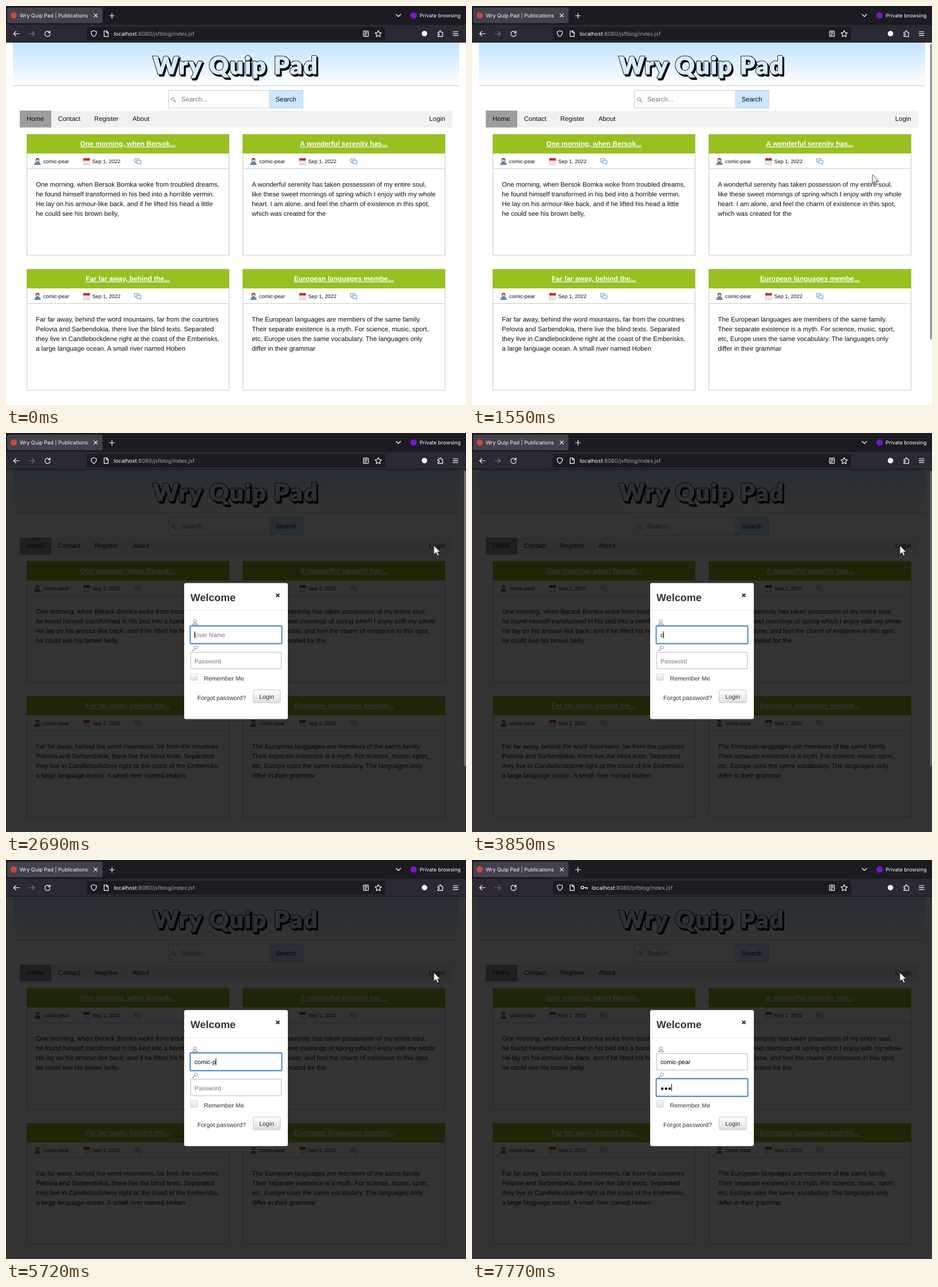
An HTML page that plays this animation: 803 px wide and 698 px high, repeating every 8 s.

```html
<!DOCTYPE html>
<html lang="en">
<head>
<meta charset="utf-8">
<title>Wry Quip Pad | Publications</title>
<style>
  html, body { margin: 0; width: 100%; height: 100%; overflow: hidden; background: #fff; }
  svg { display: block; }
  text { font: 11.37px "Liberation Sans", Arial, sans-serif; fill: #111; text-rendering: geometricPrecision; white-space: pre; }
  .ui text { font: 9.05px Inter, sans-serif; fill: #fbfbfe; }
  .ui .url { font-size: 9.45px; }
  .ui .dim { fill: #a3a2a9; }
  .ui path, .ui .line { fill: none; stroke: #fbfbfe; stroke-width: 1.15; stroke-linecap: round; stroke-linejoin: round; }
  .logo { font: 900 42px Lato, sans-serif; text-anchor: middle; letter-spacing: 2px; fill: #000; stroke: #000; stroke-width: 2.8; stroke-linejoin: round; }
  .logo.face { fill: #d7ecfe; stroke: #d7ecfe; stroke-width: 1.1; }
  .head { font-weight: 700; font-size: 12.05px; fill: #fff; text-anchor: middle; text-decoration: underline; }
  .meta { font-size: 9.15px; }
  .hint { fill: #757575; }
  .modal text { font-size: 10.6px; fill: #333; }
  .modal .welcome { font-size: 18px; font-weight: 700; }
  .modal .typed { fill: #000; }
  .modal .hint { fill: #777; }
  .field { fill: #fff; stroke: #bdbdbd; }
  .thin { fill: none; stroke: #8a8a8a; }
</style>
</head>
<body>
<svg width="803" height="698" viewBox="0 0 803 698">
  <defs>
    <linearGradient id="sky" x2="0" y2="1"><stop stop-color="#c3e3ff"/><stop offset="1" stop-color="#fff"/></linearGradient>
    <linearGradient id="grey" x2="0" y2="1"><stop stop-color="#fff"/><stop offset="1" stop-color="#dfdfdf"/></linearGradient>
    <g id="icons">
      <path d="M50 277.5q0-4.5 5-4.5t5 4.5z" fill="#4a8fd0" stroke="#285a8c" stroke-width=".7"/>
      <circle cx="55" cy="270" r="3" fill="#f0c39a" stroke="#6b3f1c" stroke-width=".6"/>
      <path d="M51.8 270q-.4-4 3.2-4t3.2 4q-1.5-2-3.2-2t-3.2 2z" fill="#6b3a17"/>
      <rect x="135.4" y="266.9" width="10.6" height="10.6" fill="#f4f4f4" stroke="#aaa" stroke-width=".7"/>
      <path d="M135 266.5h11.4v4H135z" fill="#cf2a22"/>
      <path d="M138 265.6v2.4M143.4 265.6v2.4" stroke="#333"/>
      <path d="M138 273h6M138 275.4h6" stroke="#b5b5b5" stroke-dasharray="1.3 1"/>
      <path d="M224.5 267h7.5v5.2h-4.6l-1.6 2v-2h-1.3z" fill="#eef6fd" stroke="#5d8fbb" stroke-width=".9"/>
      <path d="M228 270h7.6v5.4h-1.2v2.2l-2-2.2H228z" fill="#eef6fd" stroke="#5d8fbb" stroke-width=".9"/>
    </g>
  </defs>

  <rect width="803" height="698" fill="#fff"/>
  <rect x="12" y="64" width="779" height="75" fill="url(#sky)"/>
  <path d="M12 139.5h779" stroke="#c6c6c6"/>
  <text class="logo" x="403.5" y="121.5">Wry Quip Pad</text>
  <text class="logo" x="401" y="119">Wry Quip Pad</text>
  <text class="logo face" x="401" y="119">Wry Quip Pad</text>

  <rect class="field" x="283.5" y="147.5" width="235" height="31" style="stroke:#ccc"/>
  <path d="M459 148h59.5v30H459z" fill="#cbe7ff"/>
  <circle class="thin" cx="291.3" cy="163" r="2.8"/><path class="thin" d="M293.5 165.3l3 3" stroke-width="1.6"/>
  <text class="hint" x="306" y="167">Search...</text>
  <text x="470.5" y="167">Search</text>

  <path d="M24 183h755v29.5H24z" fill="#f1f1f1"/>
  <path d="M24 183h55v29.5H24z" fill="#9d9d9d"/>
  <path id="hover" d="M727 183h52v29.5h-52z" fill="#c9c9c9"/>
  <text x="36" y="201">Home</text><text x="90.7" y="201">Contact</text><text x="154" y="201">Register</text>
  <text x="220.7" y="201">About</text><text x="738.8" y="201">Login</text>

  <g id="cards"></g>

  <g id="modal" class="modal">
    <path d="M0 64h803v634H0z" fill-opacity=".8"/>
    <rect x="311" y="262.5" width="181" height="238" rx="3" fill="#fff"/>
    <text class="welcome" x="322" y="294">Welcome</text>
    <path d="M471.7 281.2l5.6 5.6m0-5.6l-5.6 5.6" stroke="#333" stroke-width="2.2"/>
    <path d="M311 310.5h181" stroke="#ececec"/>
    <circle class="thin" cx="329.8" cy="329.3" r="2.6"/>
    <path class="thin" d="M325.3 335.5q.4-3 4.5-3t4.5 3z"/>
    <circle class="thin" cx="331.5" cy="375.2" r="2.7"/>
    <path class="thin" d="M329.5 377.2l-4 3.6h2.3v-1.7"/>
    <rect class="field" x="322.5" y="338.5" width="158" height="29"/>
    <rect class="field" x="322.5" y="383.5" width="158" height="29"/>
    <rect id="focus" x="321.5" y="337.5" width="160" height="31" rx="1" fill="#fff" stroke="#3b7fc2" stroke-width="1.8"/>
    <text id="user" x="329" y="357"></text>
    <text id="pass" x="329" y="402.5"></text>
    <path id="caret" d="M.5 347v12" stroke="#000"/>
    <rect x="322.5" y="421" width="11.5" height="11.5" rx="1" fill="url(#grey)" stroke="#d0d0d0"/>
    <text x="345.5" y="432.5">Remember Me</text>
    <text x="334" y="466.5">Forgot password?</text>
    <rect x="431.5" y="449.5" width="47.5" height="22.5" rx="2.5" fill="url(#grey)" stroke="#c9c9c9"/>
    <text x="442" y="464.5">Login</text>
  </g>

  <rect id="scroll" x="800" y="66" width="2.5" height="517" rx="1" fill="#7d7d7d"/>

  <g class="ui">
    <path d="M0 0h803v33H0z" style="fill:#1c1b22;stroke:none"/>
    <path d="M0 33h803v31H0z" style="fill:#2b2a33;stroke:none"/>
    <path d="M0 63.5h803" style="stroke:#111016"/>
    <rect x="2" y="3" width="166.5" height="27" rx="3" fill="#42414d"/>
    <circle cx="13.5" cy="16.5" r="5.5" fill="#c9483c"/>
    <text x="24" y="20">Wry Quip Pad<tspan x="85.5">| Publications</tspan></text>
    <path d="M153.8 13.8l5.6 5.6m0-5.6l-5.6 5.6M180.5 17h9M185 12.5v9M681 14.5l4 4 4-4"/>
    <circle cx="711.5" cy="16.5" r="5.6" fill="#7a14d0"/>
    <text x="722" y="20">Private browsing</text>
    <path d="M23 48.5H13.3m4-4l-4 4 4 4"/>
    <path d="M40 48.5h9.7m-4-4l4 4-4 4" style="stroke:#74737b"/>
    <path d="M76.3 46.2a4.6 4.6 0 1 0 .7 3M77 43.5v3.3h-3.3"/>
    <rect x="141" y="36.5" width="521" height="24" rx="3" fill="#1c1b22"/>
    <path d="M153.3 43.2l4.6 1.5q.4 6-4.6 8.9-5-2.9-4.6-8.9zM171.3 43.5h4.2l3 3v6.8h-7.2zM175.3 43.6v3.1h3.1"/>
    <g id="key"><circle class="line" cx="192.7" cy="48.3" r="2.4"/><path d="M195.2 48.3h6.3v2.2m-2.6-2.2v1.8"/></g>
    <text id="url" class="url" y="52">localhost<tspan class="dim">:8080/jsfblog/index.jsf</tspan></text>
    <rect class="line" x="624" y="43.8" width="8.6" height="9.4" rx="1"/>
    <path d="M626.2 46.4h4.2m-4.2 2.1h4.2m-4.2 2.1h2.6"/>
    <path d="M649.8 43l1.7 3.6 3.9.5-2.9 2.7.8 3.9-3.5-1.9-3.5 1.9.8-3.9-2.9-2.7 3.9-.5z"/>
    <circle cx="730.5" cy="48.3" r="4.8" fill="#fbfbfe"/>
    <path d="M754 46h2.7v-1.2a1.4 1.4 0 0 1 2.8 0V46h2.8v7.3H754v-2.4h1.2a1.3 1.3 0 0 0 0-2.6H754z"/>
    <path d="M780.5 45h8.6m-8.6 3.3h8.6m-8.6 3.3h8.6"/>
  </g>

  <g id="pointer">
    <g id="arrow">
      <path d="M2 2v15l3.6-3 2.6 5.5 2.4-1.1L8.1 13h4.5z" opacity=".25"/>
      <path d="M0 0v15l3.6-3 2.6 5.5 2.4-1.1L6.1 11h4.5z" fill="#f4f4f4" stroke="#444" stroke-width=".9"/>
    </g>
    <g id="hand" transform="scale(1.1)">
      <path d="M1 10h11v4l-2 5H3l-6-8z" opacity=".4"/>
      <path d="M-1.4 1.2q1.4-1.8 2.8 0V6.5q1.4-1 2.6.2 1.4-.8 2.5.4 2-.6 2.3 1.4v4q-.3 2.600-1.500 4.600H.3L-4.600 11.500q-.8-2 1-2l2.200 1.500z" fill="#fff" stroke="#222" stroke-linejoin="round"/>
      <path d="M1.400 6.500v3M4 7v2.500M6.500 7.500v2" stroke="#222" stroke-width=".8"/>
    </g>
  </g>
</svg>
<script>
const $ = id => document.getElementById(id);
const LOOP = 8000, LOGIN = "comic-pear";
const USER_KEYS = [3850, 4170, 4250, 4420, 4660, 5400, 5720, 5890, 6050, 6210];
const PASS_KEYS = [7120, 7530, 7690];

const posts = [
  ["One morning, when Bersok...",
   "One morning, when Bersok Bomka woke from troubled dreams,",
   "he found himself transformed in his bed into a horrible vermin.",
   "He lay on his armour-like back, and if he lifted his head a little",
   "he could see his brown belly,"],
  ["A wonderful serenity has...",
   "A wonderful serenity has taken possession of my entire soul,",
   "like these sweet mornings of spring which I enjoy with my whole",
   "heart. I am alone, and feel the charm of existence in this spot,",
   "which was created for the"],
  ["Far far away, behind the...",
   "Far far away, behind the word mountains, far from the countries",
   "Pelovia and Sarbendokia, there live the blind texts. Separated",
   "they live in Candlebockdene right at the coast of the Emberisks,",
   "a large language ocean. A small river named Hoben"],
  ["European languages membe...",
   "The European languages are members of the same family.",
   "Their separate existence is a myth. For science, music, sport,",
   "etc, Europe uses the same vocabulary. The languages only",
   "differ in their grammar"]
];

const card = ([title, ...lines], i) => `
  <g transform="translate(${i % 2 * 377} ${i > 1 ? 236 : 0})">
    <rect x="36.5" y="224.5" width="353" height="211.5" fill="#fff" stroke="#c9c9c9"/>
    <path d="M36 224.5h353.5V258H36z" fill="#98c021"/>
    <path d="M37 284.5h352" stroke="#c9c9c9"/>
    <text class="head" x="212.8" y="245">${title}</text>
    <use href="#icons"/>
    <text class="meta" x="65" y="274.7">${LOGIN}</text>
    <text class="meta" x="150.5" y="274.7">Sep 1, 2022</text>
    ${lines.map((s, n) => `<text x="52.2" y="${316 + n * 17}">${s}</text>`).join("")}
  </g>`;
$("cards").innerHTML = posts.map(card).join("");

const show = (id, on) => $(id).setAttribute("visibility", on ? "visible" : "hidden");
const typedCount = (keys, t) => keys.filter(k => t >= k).length;
const mix = (a, b, u) => a + (b - a) * u;
const curve = (a, b, c, u) => mix(mix(a, b, u), mix(b, c, u), u);

// The pointer is sampled about every 79 ms: a wide sweep, then a slow approach to the link.
function pointerAt(t) {
  const n = Math.min(15, Math.floor((t - 840) / 78.8));
  if (n < 10) {
    const u = n / 9;
    return [curve(121, 660, 699, u), curve(572, 420, 295, u)];
  }
  const u = 1 - (1 - (n - 10) / 5) ** 2;
  return [mix(710, 747, u), mix(257, 197, u)];
}

function fill(id, value, hint) {
  const el = $(id), text = value || hint;
  if (el.textContent !== text) el.textContent = text;
  el.setAttribute("class", value ? "typed" : "hint");
  return value ? el.getComputedTextLength() : 0;
}

function draw(t) {
  const [x, y] = pointerAt(t);
  const open = t >= 2690, over = !open && t >= 840 && x > 727 && y < 212;
  $("pointer").setAttribute("transform", `translate(${x} ${y})`);
  show("arrow", t >= 840 && !over);
  show("hand", over);
  show("hover", over);
  $("scroll").setAttribute("opacity", t < 840 ? 0 : Math.max(0, Math.min(1, (4250 - t) / 480)));

  $("modal").setAttribute("display", open ? "inline" : "none");
  if (open) {
    const onPass = t >= 6540, dy = onPass ? 45 : 0;
    const userWidth = fill("user", LOGIN.slice(0, typedCount(USER_KEYS, t)), "User Name");
    const passWidth = fill("pass", "●".repeat(typedCount(PASS_KEYS, t)), "Password");
    $("focus").setAttribute("transform", `translate(0 ${dy})`);
    $("caret").setAttribute("transform", `translate(${Math.round(329 + (onPass ? passWidth : userWidth))} ${dy})`);
  }
  show("caret", open && (t < 5070 || t >= 5400));

  const saved = t >= 7120;
  show("key", saved);
  $("url").setAttribute("x", saved ? 209 : 188);
}

function tick() {
  draw(performance.now() % LOOP);
  requestAnimationFrame(tick);
}
tick();
</script>
</body>
</html>
```
